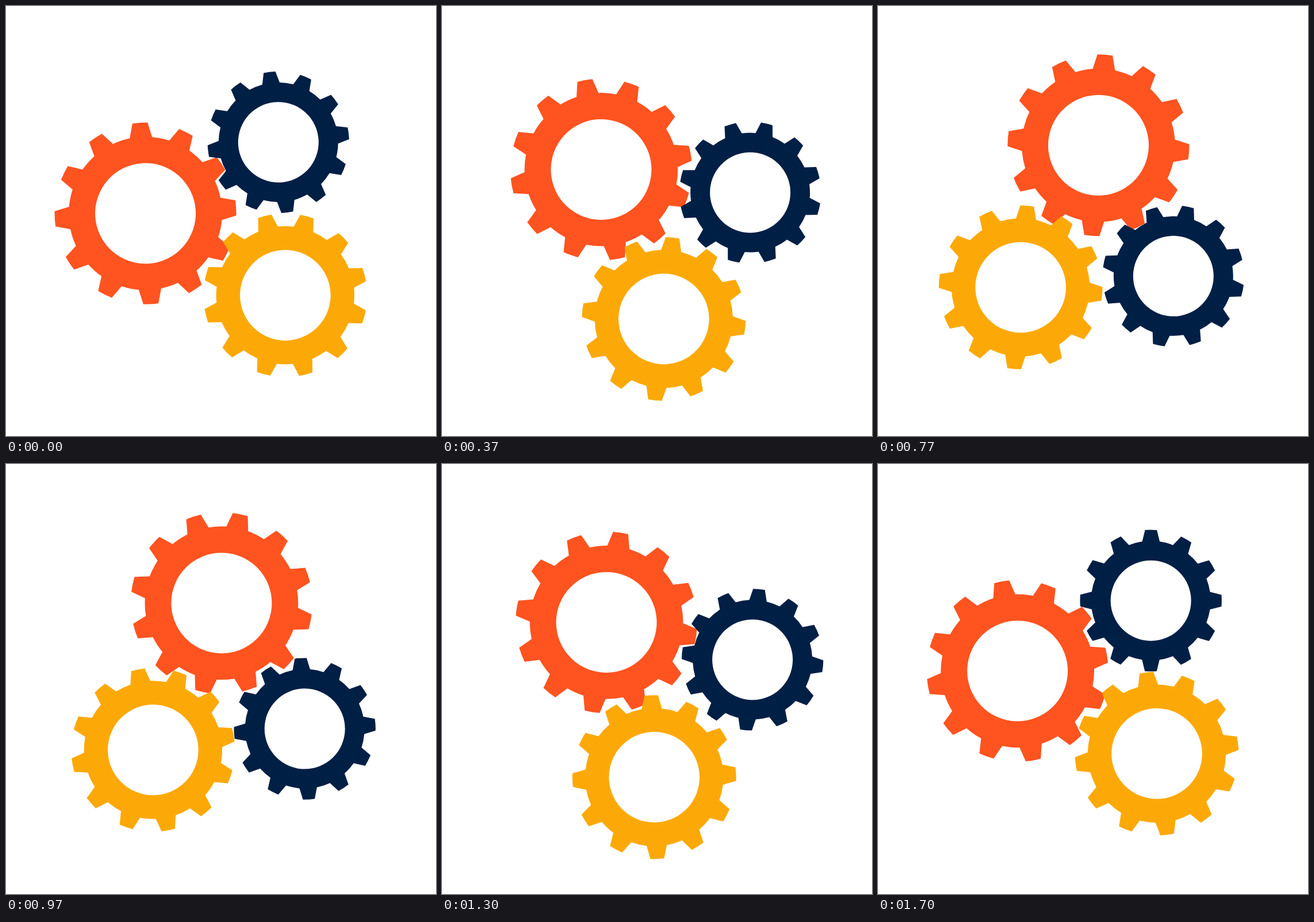
An HTML page for the animation above (1730 ms loop, 748x748 px).

```html
<!DOCTYPE html>
<html lang="en">
<head>
<meta charset="utf-8">
<title>Gears</title>
<style>
  html, body { margin: 0; width: 100%; height: 100%; overflow: hidden; background: #fff; }
  svg { display: block; width: 100%; height: 100%; }
</style>
</head>
<body>
<svg id="stage" viewBox="0 0 748 748"></svg>
<script>
const LOOP = 1730, STEPS = 52, PEAK = 25, SWING = 90, TEETH = 12;

// orbit and angle place the gear around the stage centre; phase is its own start rotation
const gears = [
  { color: '#ff5320', size: 158, hole: 87.5, orbit: 132.1, angle: 185.74, phase: -3.45, spin: 360 },
  { color: '#fca908', size: 142.4, hole: 78.8, orbit: 170.8, angle: 49.1, phase: 15.4, spin: -360 },
  { color: '#001f45', size: 123.2, hole: 70, orbit: 169.5, angle: -53.93, phase: -7.2, spin: -360 }
];

const NS = 'http://www.w3.org/2000/svg';
const stage = document.getElementById('stage');

function point(r, deg) {
  const a = deg * Math.PI / 180;
  return (r * Math.cos(a)).toFixed(2) + ' ' + (r * Math.sin(a)).toFixed(2);
}

function gearPath(size, hole) {
  const root = size * 0.844, tip = 4.8, base = 8.4;
  const arc = r => `A${r} ${r} 0 0 1 `;
  let d = '';
  for (let i = 0; i < TEETH; i++) {
    const a = i * 360 / TEETH;
    d += (i ? arc(root) : 'M') + point(root, a - base)
      + 'L' + point(size, a - tip)
      + arc(size) + point(size, a + tip)
      + 'L' + point(root, a + base);
  }
  d += arc(root) + point(root, -base) + 'Z';
  return d + `M${hole} 0A${hole} ${hole} 0 1 0 ${-hole} 0A${hole} ${hole} 0 1 0 ${hole} 0Z`;
}

for (const g of gears) {
  g.node = document.createElementNS(NS, 'path');
  g.node.setAttribute('d', gearPath(g.size, g.hole));
  g.node.setAttribute('fill', g.color);
  g.node.setAttribute('fill-rule', 'evenodd');
  stage.append(g.node);
}

const smooth = u => u * u * (3 - 2 * u);

function draw(ms) {
  // 30 steps a second, switching on whole hundredths
  const step = Math.floor((Math.floor(ms / 10) * 10 + 5) * 0.03);
  const swing = SWING * (step < PEAK
    ? smooth(step / PEAK)
    : 1 - smooth((step - PEAK) / (STEPS - PEAK)));
  for (const g of gears) {
    const turn = g.phase + swing + g.spin * step / STEPS;
    g.node.setAttribute('transform',
      `translate(374 374) translate(${point(g.orbit, g.angle + swing)}) rotate(${turn})`);
  }
}

const start = performance.now();
function tick() {
  draw((performance.now() - start) % LOOP);
  requestAnimationFrame(tick);
}
tick();
</script>
</body>
</html>
```
